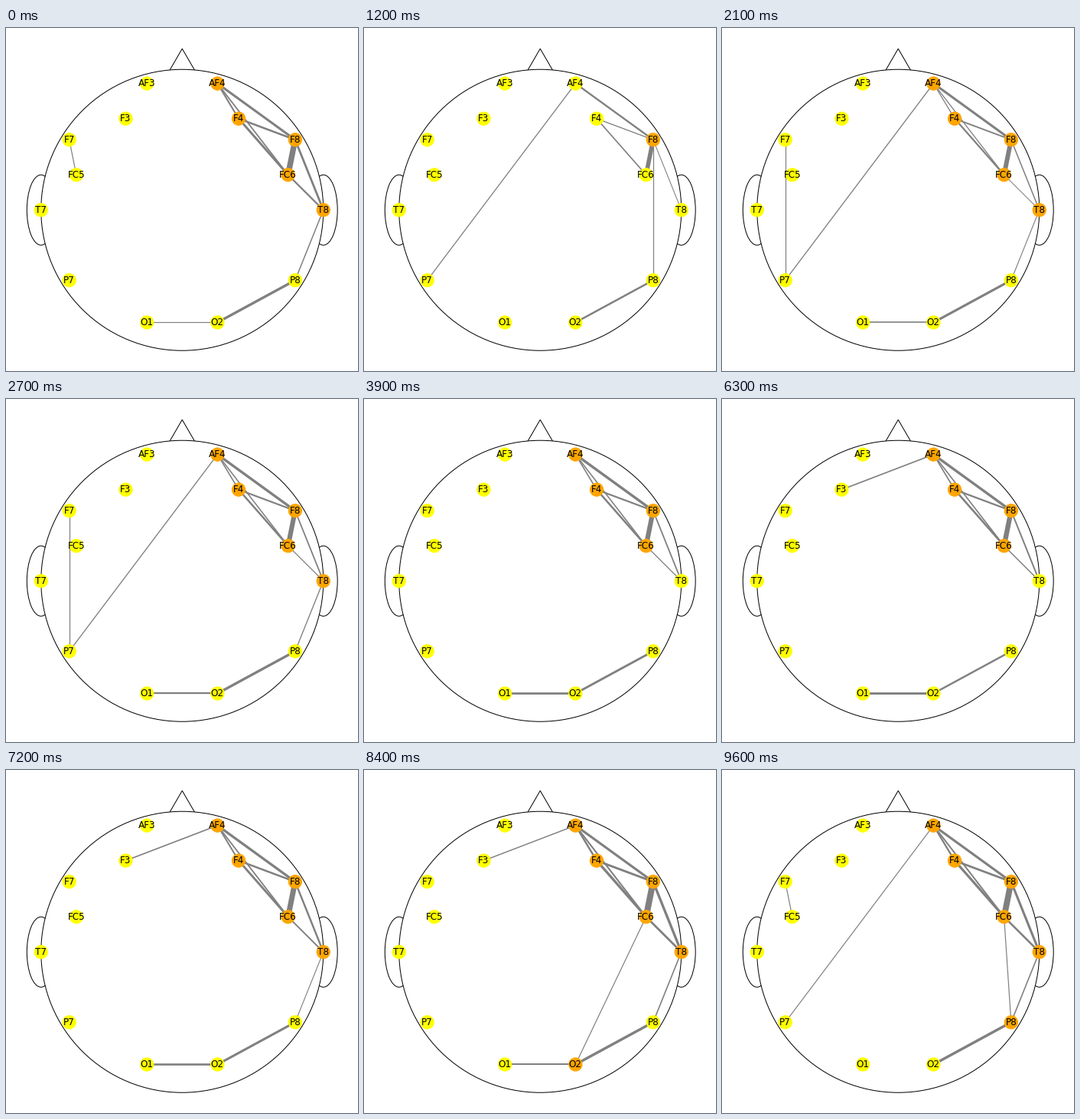
A matplotlib script for the animation above (9.9 s loop, 460 by 449 pixels).

```python
import numpy as np
import matplotlib.pyplot as plt
from matplotlib.animation import FuncAnimation
from matplotlib.collections import LineCollection
from matplotlib.patches import Circle, Ellipse, Polygon
from matplotlib.transforms import Affine2D

W, H, DPI = 460, 449, 72
FRAMES, STEP = 33, 300
UX, UY, CX, CY = 46.12, 46.0, 230.25, 238.24
CUTOFF = 1.0  # thinner links stay hidden
HUB = 3       # links that make a node a hub

# Right-hand electrodes in head units; the left ones mirror them.
RIGHT = {"AF4": (1, 3.6), "F4": (1.6, 2.6), "F8": (3.2, 2), "FC6": (3, 1),
         "T8": (4, 0), "P8": (3.2, -2), "O2": (1, -3.2)}
LEFT = ("AF3", "F3", "F7", "FC5", "T7", "P7", "O1")

POS = {}
for (name, (x, y)), twin in zip(RIGHT.items(), LEFT):
    POS[name] = (CX + UX * x, CY - UY * y)
    POS[twin] = (CX - UX * x, CY - UY * y)

# Lasting links: resting width and gain during the surge.
LASTING = {
    "AF4-F8": (3.4, -0.3), "AF4-F4": (1.6, 0.9), "AF4-FC6": (1.6, 0.5),
    "F4-F8": (2.2, 0.7), "F4-FC6": (2.5, 0.9), "F8-FC6": (6.2, 2),
    "F8-T8": (1.8, 1.6), "FC6-T8": (1.3, 1.6),
    "T8-P8": (1.5, 0.2), "O2-P8": (3.5, 0),
}
# Passing links: steps (start, end) during which they show.
PASSING = {
    "F8-P8": [(3, 6)], "F7-P7": [(6, 11)], "T7-P7": [(29, 31)],
    "AF4-P7": [(3, 13), (31, 33)], "AF4-F3": [(15, 30)],
    "F3-F4": [(15, 20)], "F3-F8": [(15, 20)], "F7-FC5": [(31, 35)],
    "FC6-O2": [(11, 13), (26, 30)], "FC6-P8": [(31, 33)],
    "O1-O2": [(7, 30), (33, 35)],
}


def bump(t, center, width):
    """Bell curve that wraps around the loop."""
    d = (t - center + FRAMES / 2) % FRAMES - FRAMES / 2
    return np.exp(-0.5 * (d / width) ** 2)


def swell(age, span):
    """Width of a passing link; long ones grow thicker."""
    return 1.2 + (span / 19) ** 3 * np.sqrt(np.sin(np.pi * (age + 0.5) / span))


def active(t):
    lull, ebb, surge = bump(t, 4, 2), bump(t, 18, 4), bump(t, 29.5, 4)
    links = {}
    for link, (rest, gain) in LASTING.items():
        width = rest + gain * surge - lull
        if link.endswith("P8"):
            width -= 1.4 * ebb
        if width >= CUTOFF:
            links[link] = width
    for link, spans in PASSING.items():
        for start, end in spans:
            age = (t - start) % FRAMES
            if age < end - start:
                links[link] = swell(age, end - start)
    return links


fig = plt.figure(figsize=(W / DPI, H / DPI), dpi=DPI, facecolor="white")
ax = fig.add_axes([0, 0, 1, 1])
ax.set(xlim=(0, W), ylim=(H, 0))
ax.axis("off")

# Ears and nose sit behind the filled head.
head = Affine2D().scale(UX, -UY).translate(CX, CY) + ax.transData
shapes = [Ellipse((-4, 0), 0.8, 2), Ellipse((4, 0), 0.8, 2),
          Polygon([(0, 4.59), (-0.52, 3.69), (0.52, 3.69)]), Circle((0, 0), 4)]
for z, shape in enumerate(shapes):
    shape.set(facecolor="white", edgecolor="black", linewidth=1,
              zorder=z / 10, transform=head)
    ax.add_artist(shape)

lines = LineCollection([], colors="gray", zorder=1)
ax.add_collection(lines, autolim=False)
dots = ax.scatter(*zip(*POS.values()), s=300, c="yellow", linewidths=1, zorder=2)
for name, (x, y) in POS.items():
    ax.text(x, y, name, fontsize=12, family="DejaVu Sans",
            ha="center", va="center", zorder=3)


def update(t):
    links = active(t)
    ends = [link.split("-") for link in links]
    lines.set_segments([[POS[a], POS[b]] for a, b in ends])
    lines.set_linewidths(list(links.values()))
    flat = sum(ends, [])
    colors = ["orange" if flat.count(n) >= HUB else "yellow" for n in POS]
    dots.set_facecolor(colors)
    dots.set_edgecolor(colors)
    return lines, dots


anim = FuncAnimation(fig, update, frames=FRAMES, interval=STEP,
                     repeat=True, repeat_delay=0, blit=False)
plt.show()
```
